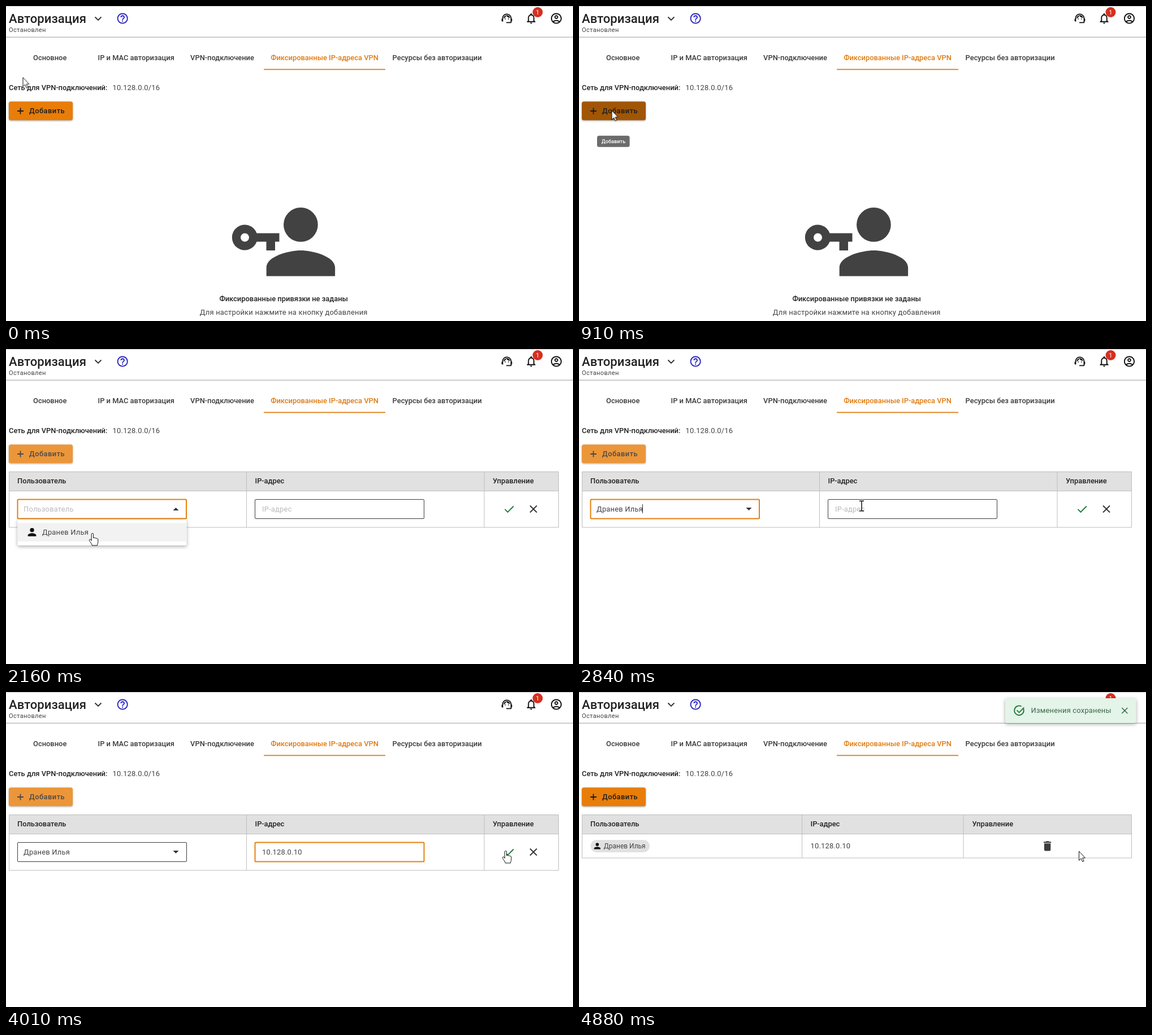
An HTML page that plays this animation: 1003 by 558 pixels, repeating every 5.01 s.

```html
<!DOCTYPE html>
<html lang="ru">
<head>
<meta charset="utf-8">
<title>Авторизация</title>
<style>
html, body { margin: 0; width: 100%; height: 100%; overflow: hidden; background: #fff; }
svg { display: block; width: 100%; height: 100%; }
text { font: 400 12.88px Roboto, sans-serif; letter-spacing: .0179em; fill: #424242; }
.b { font-weight: 500; letter-spacing: 0; fill: #212121; }
.tab { fill: #3a3a3a; text-anchor: middle; }
.mid { text-anchor: middle; }
.hint { fill: #b9b9b9; }
.tip { font-size: 9.2px; font-weight: 500; fill: #fff; text-anchor: middle; letter-spacing: 0; }
.line { fill: none; stroke: #bdbdbd; }
.field { fill: #fff; stroke: #3c3c3c; }
.focus { fill: none; stroke: #e6800f; stroke-width: 2; }
.caret { stroke: #333; }
.panel { filter: drop-shadow(0 2px 3px #0005); }

/* timed parts: hidden unless their keyframes show them */
.t { opacity: 0; animation: 5.01s step-end infinite; }
.soft { animation-timing-function: linear; }

#empty { animation-name: empty; }
@keyframes empty { 0% { opacity: 1 } 19.96%, to { opacity: 0 } }
#edit { animation-name: edit; }
@keyframes edit { 19.96% { opacity: 1 } 89.21%, to { opacity: 0 } }
#saved { animation-name: saved; }
@keyframes saved { 89.21%, to { opacity: 1 } }

#add { opacity: 1; animation-name: add; filter: drop-shadow(0 1.5px 1.5px #0006); }
@keyframes add { 19.96% { opacity: .8 } 89.21%, to { opacity: 1 } }
#face { fill: #e87d09; animation: face 5.01s linear infinite; }
@keyframes face {
  0%, 6.5% { fill: #e87d09 }
  9%, 14.57% { fill: #c26907 }
  16%, 19.95% { fill: #a05605 }
  19.96%, to { fill: #e87d09 }
}
#tipAdd { animation-name: tipAdd; }
@keyframes tipAdd { 0%, 8.5% { opacity: 0 } 10.55%, 18.5% { opacity: 1 } 19.96%, to { opacity: 0 } }
#tipSave { animation-name: tipSave; }
@keyframes tipSave { 0%, 81.4% { opacity: 0 } 82.8%, 84% { opacity: 1 } 86.2%, to { opacity: 0 } }

#row { opacity: 1; animation-name: row; }
@keyframes row { 85.2% { opacity: .5 } 89.21%, to { opacity: 1 } }
#focusUser { animation-name: focusUser; }
@keyframes focusUser { 29.94% { opacity: 1 } 59.5%, to { opacity: 0 } }
#focusIp { animation-name: focusIp; }
@keyframes focusIp { 59.5% { opacity: 1 } 85.2%, to { opacity: 0 } }
#hintUser { animation-name: hintUser; }
@keyframes hintUser { 0% { opacity: 1 } 48.49%, to { opacity: 0 } }
#user { animation-name: user; }
@keyframes user { 48.49%, to { opacity: 1 } }
#hintIp { animation-name: hintIp; }
@keyframes hintIp { 0% { opacity: 1 } 62.07%, to { opacity: 0 } }
#ip { animation-name: ip; }
@keyframes ip { 62.07%, to { opacity: 1 } }
#caretA { animation-name: caretA; }
@keyframes caretA { 29.94% { opacity: 1 } 38.1%, to { opacity: 0 } }
#caretB { animation-name: caretB; }
@keyframes caretB { 48.49% { opacity: 1 } 59.5%, to { opacity: 0 } }
#caretC { animation-name: caretC; }
@keyframes caretC { 59.5% { opacity: 1 } 62.07%, to { opacity: 0 } }
#caretD { animation-name: caretD; }
@keyframes caretD { 62.07% { opacity: 1 } 70.4%, to { opacity: 0 } }
#list { transform-origin: 170px 302px; animation-name: list; }
@keyframes list {
  0%, 29.94% { opacity: 0; transform: scaleY(.8) }
  33.5%, 48.48% { opacity: 1; transform: none }
  50.5%, to { opacity: 0; transform: none }
}
#turn { transform-origin: 300.5px 283.5px; animation: turn 5.01s step-end infinite; }
@keyframes turn { 0% { transform: none } 29.94% { transform: scaleY(-1) } 48.49%, to { transform: none } }
#toast { transform-origin: 870px 33px; animation-name: toast; }
@keyframes toast {
  0%, 90.6% { opacity: 0; transform: scale(.8) }
  95%, to { opacity: 1; transform: none }
}

#pointer { animation: move 5.01s step-end infinite; }
@keyframes move {
  0% { transform: translate(29.5px, 126.5px) }
  2.59% { transform: translate(29.5px, 126.5px); animation-timing-function: steps(5, start) }
  9.3% { transform: translate(57.5px, 185px) }
  20.9% { transform: translate(57.5px, 185px); animation-timing-function: steps(4, start) }
  25.94% { transform: translate(190px, 216px); animation-timing-function: steps(2, start) }
  28.7% { transform: translate(163px, 278px) }
  29.94% { transform: translate(163px, 284px) }
  36.92% { transform: translate(163px, 284px); animation-timing-function: steps(6, start) }
  44.34% { transform: translate(153px, 327px) }
  48.49% { transform: translate(153px, 327px); animation-timing-function: steps(7, start) }
  58.03% { transform: translate(500px, 278px) }
  62.07% { transform: translate(500px, 278px); animation-timing-function: steps(5, start) }
  69.05% { transform: translate(744px, 281px); animation-timing-function: steps(8, start) }
  80.01% { transform: translate(878px, 285px) }
  80.03%, to { transform: translate(884px, 282px) }
}
#arrow { animation-name: arrow; }
@keyframes arrow {
  0% { opacity: 1 } 27.3% { opacity: 0 } 48.49% { opacity: 1 } 55.2% { opacity: 0 }
  67.6% { opacity: 1 } 78.6% { opacity: 0 } 89.21%, to { opacity: 1 }
}
#beam { animation-name: beam; }
@keyframes beam { 27.3% { opacity: 1 } 39.3% { opacity: 0 } 55.2% { opacity: 1 } 67.6%, to { opacity: 0 } }
#hand { animation-name: hand; }
@keyframes hand { 39.3% { opacity: 1 } 48.49% { opacity: 0 } 78.6% { opacity: 1 } 89.21%, to { opacity: 0 } }
</style>
</head>
<body>
<svg viewBox="0 0 1003 558">
  <defs>
    <path id="person" d="M12 12a4 4 0 1 0 0-8 4 4 0 0 0 0 8zm0 2c-2.67 0-8 1.34-8 4v2h16v-2c0-2.66-5.33-4-8-4z"/>
    <path id="cross" d="M-6-6 6 6M6-6-6 6" fill="none" stroke-width="1.9"/>
  </defs>

  <!-- page header -->
  <path class="line" d="M0 .5H1003" stroke-opacity=".8"/>
  <path class="line" d="M0 55.2H1003" stroke-width="1.4"/>
  <text class="b" x="5" y="30" style="font-size:22.08px">Авторизация</text>
  <text x="5" y="45.5" style="font-size:11.04px;letter-spacing:.0333em">Остановлен</text>
  <path d="m157.500 19.500 5.500 5.500 5.500-5.500" fill="none" stroke="#333" stroke-width="1.900"/>
  <path transform="translate(194.800 10.600) scale(.95)" fill="#2a25c4" d="M11 18h2v-2h-2v2zm1-16C6.480 2 2 6.480 2 12s4.480 10 10 10 10-4.480 10-10S17.520 2 12 2zm0 18c-4.410 0-8-3.590-8-8s3.590-8 8-8 8 3.590 8 8-3.590 8-8 8zm0-14c-2.210 0-4 1.790-4 4h2c0-1.100.9-2 2-2s2 .9 2 2c0 2-3 1.750-3 5h2c0-2.250 3-2.500 3-5 0-2.210-1.790-4-4-4z"/>
  <g fill="#111">
    <path transform="translate(874.700 10.600) scale(.94)" d="M21 12.220C21 6.730 16.740 3 12 3c-4.690 0-9 3.650-9 9.280C2.400 12.620 2 13.260 2 14v2c0 1.100.9 2 2 2h1v-6.100c0-3.870 3.130-7 7-7s7 3.130 7 7V19h-8v2h8c1.100 0 2-.9 2-2v-1.220c.59-.31 1-.92 1-1.640v-2.300c0-.7-.41-1.310-1-1.620zM9 12a1 1 0 1 0 0 2 1 1 0 0 0 0-2zm6 0a1 1 0 1 0 0 2 1 1 0 0 0 0-2zM18 11.030C17.520 8.180 15.040 6 12.050 6c-3.030 0-6.290 2.510-6.030 6.450 2.470-1.010 4.330-3.210 4.860-5.890 1.310 2.630 4 4.440 7.120 4.470z"/>
    <path transform="translate(917.600 10.600) scale(.95)" d="M12 22c1.100 0 2-.9 2-2h-4c0 1.100.9 2 2 2zm6-6v-5c0-3.070-1.630-5.640-4.500-6.320V4c0-.83-.67-1.500-1.500-1.500s-1.500.67-1.500 1.500v.68C7.640 5.360 6 7.920 6 11v5l-2 2v1h16v-1l-2-2zm-2 1H8v-6c0-2.480 1.510-4.500 4-4.500s4 2.020 4 4.500v6z"/>
    <path transform="translate(962.100 10.600) scale(.95)" d="M12 2C6.480 2 2 6.480 2 12s4.480 10 10 10 10-4.480 10-10S17.520 2 12 2zM7.350 18.500C8.660 17.560 10.260 17 12 17s3.340.56 4.650 1.500C15.340 19.440 13.740 20 12 20s-3.340-.56-4.650-1.500zm10.790-1.380C16.450 15.800 14.320 15 12 15s-4.450.8-6.140 2.120C4.700 15.730 4 13.950 4 12c0-4.420 3.580-8 8-8s8 3.580 8 8c0 1.950-.7 3.730-1.860 5.120zM12 6c-1.930 0-3.500 1.570-3.500 3.500S10.070 13 12 13s3.500-1.570 3.500-3.500S13.930 6 12 6zm0 5c-.83 0-1.500-.67-1.500-1.500S11.170 8 12 8s1.500.67 1.500 1.500S12.830 11 12 11z"/>
  </g>
  <circle cx="940.5" cy="11" r="9" fill="#d62f1f"/>
  <text class="mid" x="940.5" y="15" style="font-size:11px;fill:#fff">1</text>

  <!-- tabs -->
  <text class="b tab" x="77.700" y="95.600">Основное</text>
  <text class="b tab" x="230.200" y="95.600">IP и MAC авторизация</text>
  <text class="b tab" x="382.500" y="95.600">VPN-подключение</text>
  <text class="b tab" x="563.500" y="95.600" style="fill:#e07a10">Фиксированные IP-адреса VPN</text>
  <text class="b tab" x="762.600" y="95.600">Ресурсы без авторизации</text>
  <path d="M456 112.400H671" stroke="#e07a10" stroke-width="1.900"/>

  <text class="b" x="5" y="149">Сеть для VPN-подключений:</text>
  <text x="188.600" y="148.500">10.128.0.0/16</text>

  <g id="add" class="t">
    <rect id="face" x="5" y="169.300" width="113" height="33" rx="3.500"/>
    <path d="M20 186H31M25.500 180.500V191.500" stroke="#1c1c1c" stroke-width="1.800"/>
    <text class="b" x="41" y="190.400" style="letter-spacing:.45px;fill:#1c1c1c">Добавить</text>
  </g>

  <g id="empty" class="t" fill="#424242">
    <use href="#person" transform="translate(430.300 326.700) scale(7.590)"/>
    <path fill-rule="evenodd" d="M443.500 402.500H483.500V417.500H476V433H460.500V417.500H443.500A22.500 22.500 0 1 1 443.500 402.500zM422.500 402.500a7.500 7.500 0 1 0 0 15 7.500 7.500 0 0 0 0-15z"/>
    <text class="b mid" x="491.200" y="523">Фиксированные привязки не заданы</text>
    <text class="mid" x="491.200" y="547">Для настройки нажмите на кнопку добавления</text>
  </g>

  <!-- table while editing -->
  <g id="edit" class="t">
    <rect x="5.500" y="217.500" width="972" height="34" fill="#e1e1e1"/>
    <path class="line" d="M5.500 217.500H977.500V316H5.500zM5.500 251.500H977.500M425.500 217.500V316M846 217.500V316"/>
    <text class="b" x="20" y="238.200">Пользователь</text>
    <text class="b" x="440.500" y="238.200">IP-адрес</text>
    <text class="b" x="861" y="238.200">Управление</text>
    <g id="row" class="t">
      <rect class="field" x="20.500" y="266.500" width="299" height="34" rx="1.500"/>
      <rect class="field" x="440.500" y="266.500" width="299" height="34" rx="1.500"/>
      <rect id="focusUser" class="focus t" x="20.500" y="266.500" width="298.500" height="34" rx="1.500"/>
      <rect id="focusIp" class="focus t" x="440.500" y="266.500" width="299" height="34" rx="1.500"/>
      <path id="turn" d="M295.500 281H305.500L300.500 286z" fill="#333"/>
      <text id="hintUser" class="hint t" x="31" y="287.600">Пользователь</text>
      <text id="user" class="t" x="31" y="287.600">Дранев Илья</text>
      <text id="hintIp" class="hint t" x="453" y="287.600">IP-адрес</text>
      <text id="ip" class="t" x="453" y="287.600">10.128.0.10</text>
      <path id="caretA" class="caret t" d="M32.500 275V291"/>
      <path id="caretB" class="caret t" d="M112.500 275V291"/>
      <path id="caretC" class="caret t" d="M453.500 275V291"/>
      <path id="caretD" class="caret t" d="M522.500 275V291"/>
      <path d="m882.500 283.800 5 5 10.300-10.300" fill="none" stroke="#1d7a38" stroke-width="1.900"/>
      <use href="#cross" x="933" y="283.500" stroke="#333"/>
    </g>
  </g>
  <g id="list" class="t soft">
    <path class="panel" d="M20.500 302H319.500V346a2 2 0 0 1-2 2H22.500a2 2 0 0 1-2-2z" fill="#fff"/>
    <rect x="20.500" y="308" width="299" height="33" fill="#f2f2f2"/>
    <use href="#person" transform="translate(35 313.300) scale(.92)" fill="#111"/>
    <text x="64" y="329.300">Дранев Илья</text>
  </g>

  <!-- table after saving -->
  <g id="saved" class="t">
    <rect x="5.500" y="217.500" width="972" height="34" fill="#e1e1e1"/>
    <path class="line" d="M5.500 217.500H977.500V294H5.500zM5.500 251.500H977.500M394.500 217.500V294M680 217.500V294"/>
    <text class="b" x="20" y="238.200">Пользователь</text>
    <text class="b" x="409.500" y="238.200">IP-адрес</text>
    <text class="b" x="695.500" y="238.200">Управление</text>
    <rect x="20.500" y="262" width="104.500" height="22" rx="11" fill="#e1e1e1"/>
    <use href="#person" transform="translate(23.800 264.400) scale(.71)" fill="#111"/>
    <text x="43.800" y="277" style="font-size:11.960px;letter-spacing:0">Дранев Илья</text>
    <text x="409.500" y="277.300">10.128.0.10</text>
    <path transform="translate(817.200 261.500) scale(.95)" fill="#3c3c3c" d="M6 19c0 1.100.9 2 2 2h8c1.100 0 2-.9 2-2V7H6v12zM19 4h-3.500l-1-1h-5l-1 1H5v2h14V4z"/>
  </g>

  <g id="tipAdd" class="t soft">
    <rect x="32" y="229.700" width="57.600" height="20" rx="3.500" fill="#6b6b6b"/>
    <text class="tip" x="61" y="243">Добавить</text>
  </g>
  <g id="tipSave" class="t soft">
    <rect x="858" y="310" width="64" height="19.500" rx="3.500" fill="#6b6b6b"/>
    <text class="tip" x="890" y="323">Сохранить</text>
  </g>

  <g id="toast" class="t soft">
    <rect class="panel" x="754" y="11" width="231.500" height="44" rx="3.500" fill="#e4f4e8"/>
    <g fill="none" stroke="#20763c" stroke-width="1.800">
      <path d="M786.200 29.600A8.300 8.300 0 1 1 782.600 25.500"/>
      <path d="m774.500 32.300 4 4 8.800-8.800"/>
    </g>
    <text x="799.600" y="37.400" style="fill:#3b6649">Изменения сохранены</text>
    <use href="#cross" transform="translate(965.300 33) scale(.83)" stroke="#336a45"/>
  </g>

  <g id="pointer" stroke="#111" stroke-linejoin="round">
    <path id="arrow" class="t" fill="#fff" d="M.5 0V16.300L4.200 12.800 6.600 18.600 9.200 17.500 6.700 11.900H11.400z"/>
    <path id="beam" class="t" fill="none" stroke-width="1.500" d="M-4-8.700H4M0-8.700V8.700M-4 8.700H4"/>
    <path id="hand" class="t" fill="#fff" d="M-1.800 12.500V1.200a1.700 1.700 0 0 1 3.400 0V8a1.600 1.600 0 0 1 3 .3 1.600 1.600 0 0 1 2.800.8 1.400 1.400 0 0 1 2.400 1V15C9.800 17.500 8.500 18.500 8.500 21H-.8C-.8 18.500-3.500 16-5.600 12.200a1.600 1.600 0 0 1 2.500-1.800z"/>
  </g>
</svg>
</body>
</html>
```
